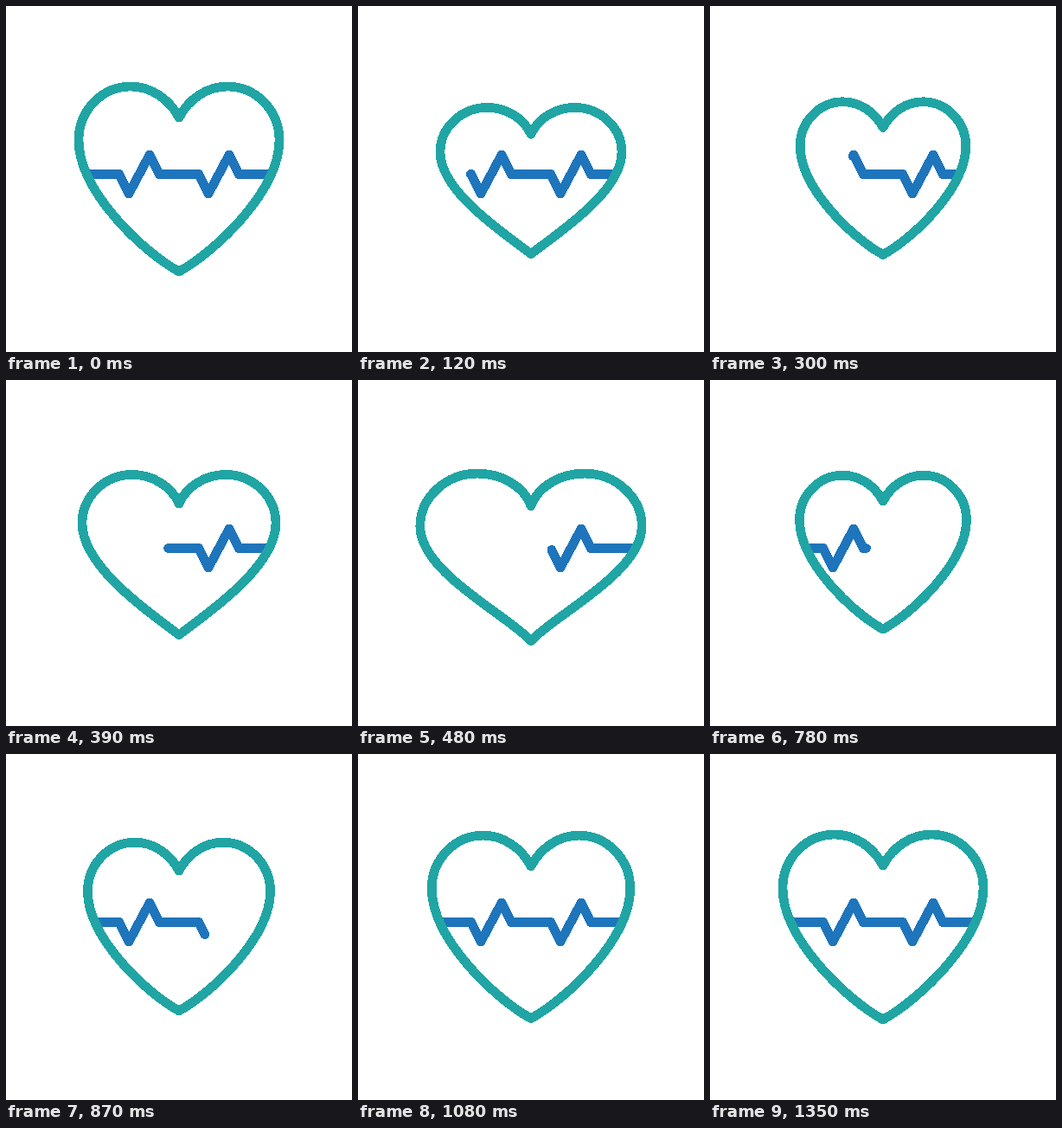
An HTML page for the animation above (3.71 s loop, 400 by 400 pixels).

```html
<!DOCTYPE html>
<html lang="en">
<head>
<meta charset="utf-8">
<title>Heartbeat</title>
<style>
  html, body { margin: 0; width: 100%; height: 100%; overflow: hidden; background: #fff; }
  svg { display: block; width: 100%; height: 100%; shape-rendering: crispEdges; }
  path { fill: none; stroke-width: 10.7; stroke-linecap: round; stroke-linejoin: round; }
  .pulse { stroke: #1e75bb; }
  #heart { stroke: #20a5a4; }
</style>
</head>
<body>
<svg viewBox="0 0 400 400">
  <clipPath id="inside"><path id="mask"/></clipPath>
  <g clip-path="url(#inside)">
    <path id="tail" class="pulse"/>
    <path id="head" class="pulse"/>
  </g>
  <path id="heart"/>
</svg>
<script>
const LOOP = 3710, STEP = 30, END = 1350;
const MID_X = 200, MID_Y = 195;
const [heart, mask, tail, head] =
  ['heart', 'mask', 'tail', 'head'].map(id => document.getElementById(id));

const smooth = u => (1 - Math.cos(Math.PI * u)) / 2;
const settle = u => 1 - Math.pow(1 - u, 3.65);
const progress = (t, a, b) => Math.min(1, Math.max(0, (t - a) / (b - a)));
const mix = (a, b, u) => a + (b - a) * u;

// Size and squash of the heart over time
const beats = [
  { t: 0, size: 1, squash: 0 },
  { t: 120, size: 0.848, squash: 0.57 },
  { t: 300, size: 0.826, squash: 0 },
  { t: 480, size: 1.005, squash: 1 },
  { t: 660, size: 0.662, squash: 0, ease: settle },
  { t: END, size: 1, squash: 0 }
];

function beatAt(t) {
  const next = Math.max(1, beats.findIndex(b => b.t >= t));
  const a = beats[next - 1], b = beats[next];
  const u = (a.ease || smooth)(progress(t, a.t, b.t));
  return { size: mix(a.size, b.size, u), squash: mix(a.squash, b.squash, u) };
}

// Half a heart as two-and-a-bit curves from notch to tip, then mirrored
function outline({ size, squash: q }) {
  const sag = 5.5 * q;
  const half = [
    [0, 129 + sag], [11 - 3 * q, 108], [32, 93], [56, 93],
    [89, 93], [116, 121 + sag / 2], [116, 155 + sag],
    [116, 214 + sag], [42 - 18 * q, 284 - 10 * q], [0, 307]
  ];
  const place = dir => ([x, y]) => [
    MID_X + dir * x * (size + 0.1 * q),
    MID_Y + (y - MID_Y) * (size - 0.1 * q) + 5.4 * q
  ].join(' ');
  const [top, ...left] = half.map(place(-1));
  const right = half.map(place(1)).reverse().slice(1);
  return `M${top}C${left.join(' ')}C${right.join(' ')}Z`;
}

const spike = 'l11 22.5 24 -45 11 22.5';
const line = `M80 194.5h51${spike}h46${spike}h51`;
tail.setAttribute('d', line);
head.setAttribute('d', line);
const length = tail.getTotalLength();

// Show the line between two shares of its length
function trim(path, from, to) {
  path.style.display = to > from ? '' : 'none';
  path.style.strokeDasharray = `${(to - from) * length} ${2 * length}`;
  path.style.strokeDashoffset = -from * length;
}

function draw(t) {
  const shape = outline(beatAt(t));
  heart.setAttribute('d', shape);
  mask.setAttribute('d', shape);
  trim(tail, progress(t, 0, 840), 1);
  trim(head, 0, progress(t, 540, 1080));
}

const start = performance.now();
function tick() {
  const t = (performance.now() - start) % LOOP;
  draw(Math.min(END, Math.floor(t / STEP) * STEP));
  requestAnimationFrame(tick);
}
tick();
</script>
</body>
</html>
```
